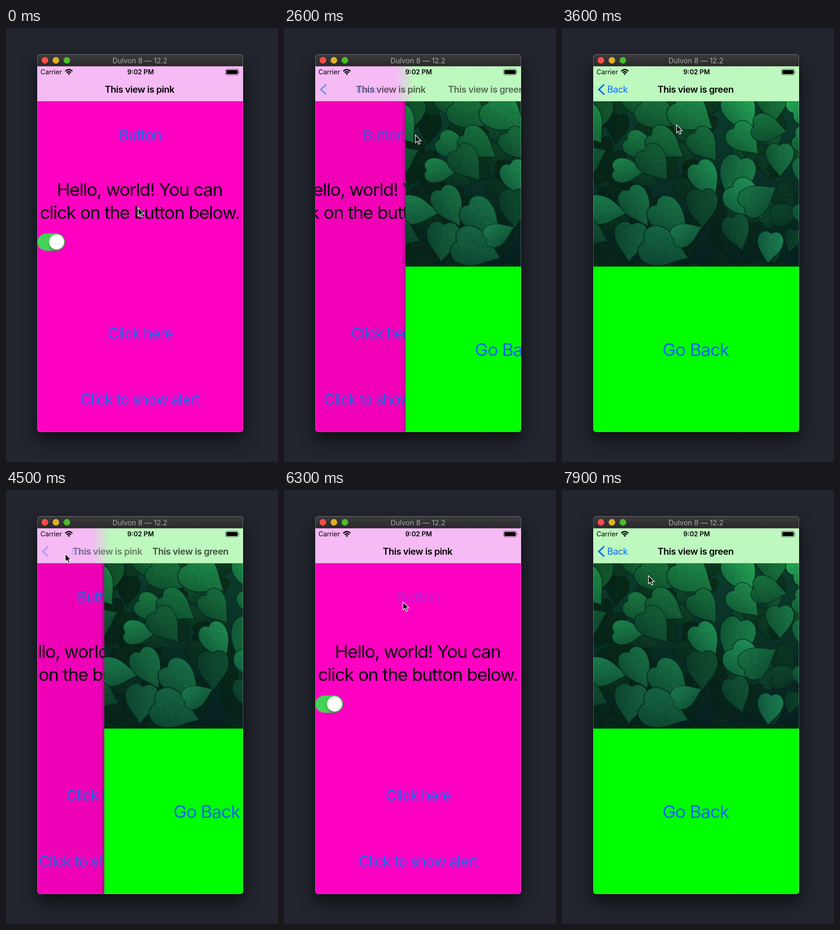
Recreate the animation shown at these times as an HTML page. Size 592 by 946 pixels, loop 8000 ms.

```html
<!DOCTYPE html>
<html lang="en">
<head>
<meta charset="utf-8">
<title>Navigation between two views</title>
<style>
html, body { margin: 0; width: 100%; height: 100%; overflow: hidden; background: #22252e; }
svg { display: block; width: 592px; height: 946px; }
text { font-family: Inter, Roboto, sans-serif; }
.mid { text-anchor: middle; }
.big { font-size: 38.8px; letter-spacing: -.034em; }
.link { font-size: 32.3px; letter-spacing: -.036em; fill: #1f6cf0; }
.nav { font-size: 20px; font-weight: 600; letter-spacing: -.024em; }
.status { font-size: 14.3px; }
.blue { fill: #0a6ff5; }
</style>
</head>
<body>
<svg viewBox="0 0 592 946">
  <defs>
    <clipPath id="window"><rect x="68" y="57" width="448" height="823.5" rx="6"/></clipPath>
    <clipPath id="photoBox"><rect x="68" y="160" width="448" height="360"/></clipPath>
    <filter id="blur" x="-30%" y="-30%" width="160%" height="160%"><feGaussianBlur stdDeviation="19"/></filter>
    <filter id="soft" x="-30%" y="-30%" width="160%" height="170%"><feGaussianBlur stdDeviation="2"/></filter>
    <linearGradient id="chrome" x2="0" y2="1">
      <stop stop-color="#3b3a3d"/><stop offset="1" stop-color="#2a292c"/>
    </linearGradient>
    <linearGradient id="tint" gradientUnits="userSpaceOnUse" x1="-20" x2="20">
      <stop stop-color="#f6baf5"/><stop offset="1" stop-color="#bdf8be"/>
    </linearGradient>
    <linearGradient id="edge"><stop stop-opacity="0"/><stop offset="1" stop-opacity=".25"/></linearGradient>
    <linearGradient id="ground" x2="0" y2="1">
      <stop stop-color="#0b3d2c"/><stop offset="1" stop-color="#061f1e"/>
    </linearGradient>
    <linearGradient id="shade" x2=".3" y2="1">
      <stop stop-color="#001c18" stop-opacity="0"/><stop offset="1" stop-color="#001c18" stop-opacity=".4"/>
    </linearGradient>
    <path id="blade" d="M-.42 0C-.6-.2-.4-.46-.15-.42C.15-.4 .3-.15 .56 0C.3 .15 .15 .4-.15 .42C-.4 .46-.6 .2-.42 0Z"/>
    <path id="veins" d="M-.42 0H.5M-.32 0L-.14-.3M-.32 0L-.14 .3M-.1 0L.1-.25M-.1 0L.1 .25M.12 0L.28-.13M.12 0L.28 .13" fill="none"/>
  </defs>

  <rect width="592" height="946" fill="#22252e"/>
  <rect x="68" y="76" width="448" height="822" rx="8" opacity=".62" filter="url(#blur)"/>

  <g clip-path="url(#window)">
    <g id="pink">
      <rect x="68" y="83" width="448" height="798" fill="#ff00c3"/>
      <text id="button" class="link mid" x="292" y="244.5">Button</text>
      <text class="big mid" x="291" y="366">Hello, world! You can</text>
      <text class="big mid" x="291" y="416">click on the button below.</text>
      <rect x="68.5" y="448" width="60" height="37.5" rx="18.7" fill="#43d356"/>
      <circle cx="110" cy="469" r="16.5" opacity=".3" filter="url(#soft)"/>
      <circle cx="110" cy="466.5" r="16.4" fill="#fff"/>
      <text class="link mid" x="292" y="677">Click here</text>
      <text class="link mid" x="292" y="821">Click to show alert</text>
    </g>
    <rect id="dim" x="68" y="83" width="448" height="798"/>

    <g id="green">
      <rect x="60" y="160" width="8" height="721" fill="url(#edge)"/>
      <rect x="68" y="83" width="448" height="798" fill="#0f0"/>
      <g clip-path="url(#photoBox)">
        <rect x="68" y="160" width="448" height="360" fill="url(#ground)"/>
        <g id="leaves"></g>
      </g>
      <text class="big mid" x="291" y="715" fill="#1268ee">Go Back</text>
    </g>

    <rect x="68" y="83" width="448" height="77" fill="url(#tint)"/>
    <rect x="68" y="159.6" width="448" height=".8" opacity=".45"/>
    <text id="pinkTitle" class="nav" y="141">This view is pink</text>
    <text id="greenTitle" class="nav" y="141">This view is green</text>
    <g id="backItem">
      <path id="chevron" d="M92 123L80 134L92 145" fill="none" stroke="#0a6ff5" stroke-width="3.2"/>
      <text id="back" class="nav blue" y="141" style="font-weight:400">Back</text>
    </g>

    <text class="status" x="75" y="101">Carrier</text>
    <path d="M129 94.2Q136.7 87.2 144.4 94.2M132 97.4Q136.7 93.2 141.4 97.4" fill="none" stroke="#000" stroke-width="2.6"/>
    <path d="M134 99.4Q136.7 97.2 139.4 99.4L136.7 102.2Z"/>
    <text class="status mid" x="293" y="101" font-weight="600">9:02 PM</text>
    <rect x="477.7" y="89.7" width="28.4" height="12.6" rx="3" fill="none" stroke="#000" stroke-opacity=".55"/>
    <rect x="479.5" y="91.5" width="24.8" height="9" rx="1.6"/>
    <path d="M507.3 94Q509.4 96 507.3 98.3Z" opacity=".6"/>

    <rect x="68" y="57" width="448" height="26.5" fill="url(#chrome)"/>
    <circle cx="84.7" cy="70.5" r="7.2" fill="#fc4e47"/>
    <circle cx="108.6" cy="70.5" r="7.2" fill="#e0b025"/>
    <circle cx="132.5" cy="70.5" r="7.2" fill="#4cbc2b"/>
    <text class="mid" x="291.5" y="76.5" font-size="15.8" letter-spacing="-.1" fill="#a9a8aa">Dulvon 8 — 12.2</text>
  </g>
  <rect x="68.5" y="57.5" width="447" height="822.5" rx="5.5" fill="none" stroke="#fff" stroke-opacity=".28"/>

  <path id="cursor" d="M0 0V17.4L4 13.8L6.8 20.3L9.8 19L7 12.8H12.6Z" stroke="#fff" stroke-width="1.3"/>
</svg>

<script>
const $ = id => document.getElementById(id);
const LOOP = 8000, STEP = 100, WIDTH = 447.5;
const PUSHES = [2497, 6340], POP = 4436;

let seed = 7;
const random = () => (seed = seed * 16807 % 2147483647) / 2147483647;
const between = (a, b) => a + (b - a) * random();

// A leaf gets darker and bluer towards the bottom left
function leaf(x, y, size, light) {
  const down = y - 160;
  const lum = Math.max(9, light - down * .03 + (x - 290) * .015);
  const hue = 142 + down * .035;
  return `<g transform="translate(${x} ${y}) rotate(${between(-40, 110)}) scale(${size} ${size * between(.85, 1.05)})">
    <use href="#blade" fill="hsl(${hue} 65% ${lum}%)" stroke="#02211b" stroke-opacity=".6" stroke-width=".025"/>
    <use href="#veins" stroke="hsl(${hue} 50% ${lum + 9}%)" stroke-width=".012" opacity=".6"/>
    <use href="#blade" fill="url(#shade)"/></g>`;
}

// Covers the photo with a jittered grid of leaves
function layer(gap, size, dark, bright) {
  let html = "";
  for (let y = 165; y < 530; y += gap)
    for (let x = 75; x < 530; x += gap)
      html += leaf(x + between(-.4, .4) * gap, y + between(-.4, .4) * gap, size * between(.75, 1.2), between(dark, bright));
  return html;
}
$("leaves").innerHTML = layer(52, 62, 11, 22) + layer(74, 88, 25, 40);

// The pointer travels between the button and the back item
const TRAVEL = 1020, BACK = [129, 139];
const MOVES = [[800, [286, 233]], [3280, BACK], [5000, [259, 244]], [7360, BACK]];

function pointer(t) {
  let [x, y] = [288, 392];
  for (const [start, [toX, toY]] of MOVES) {
    const p = Math.min(1, Math.max(0, (t - start) / TRAVEL));
    const e = p * p * (3 - 2 * p);
    x += (toX - x) * e;
    y += (toY - y) * e;
  }
  return [x, y];
}

// What is left of a critically damped spring
function rest(ms) {
  const w = Math.max(0, ms) * .01826;
  return (1 + w) * Math.exp(-w);
}

// Text fades while pressed and recovers after release
function press(t, release) {
  if (t < release - 140) return 1;
  return Math.min(1, .25 + Math.max(0, t - release) / 250);
}

// How far the green view has come in, 0 to 1
function shown(t) {
  if (t >= PUSHES[1]) return 1 - rest(t - PUSHES[1]);
  return t >= POP ? rest(t - POP) : 1 - rest(t - PUSHES[0]);
}

const set = (id, name, value) => $(id).setAttribute(name, value);
const slide = (id, x, y = 0) => set(id, "transform", `translate(${x} ${y})`);

function draw(now) {
  const t = Math.floor(now % LOOP / STEP) * STEP;
  const s = shown(t), r = 1 - s;

  slide("pink", -.3 * WIDTH * s);
  slide("green", WIDTH * r);
  set("green", "opacity", s > .001 ? 1 : 0);
  set("dim", "opacity", .1 * s);
  set("tint", "gradientTransform", `translate(${48 + 488 * r} 0)`);

  set("pinkTitle", "x", 215 - 104 * s);
  set("pinkTitle", "opacity", 1 - s ** 1.6);
  set("greenTitle", "x", 208 + 339 * r);
  set("greenTitle", "opacity", s);
  set("back", "x", 98.5 + 132 * r);
  set("back", "opacity", s * s);
  set("chevron", "opacity", s);

  set("button", "opacity", Math.min(...PUSHES.map(p => press(t, p))));
  set("backItem", "opacity", press(t, POP));
  slide("cursor", ...pointer(t));
}

const start = performance.now();
function frame() {
  draw(performance.now() - start);
  requestAnimationFrame(frame);
}
frame();
</script>
</body>
</html>
```
